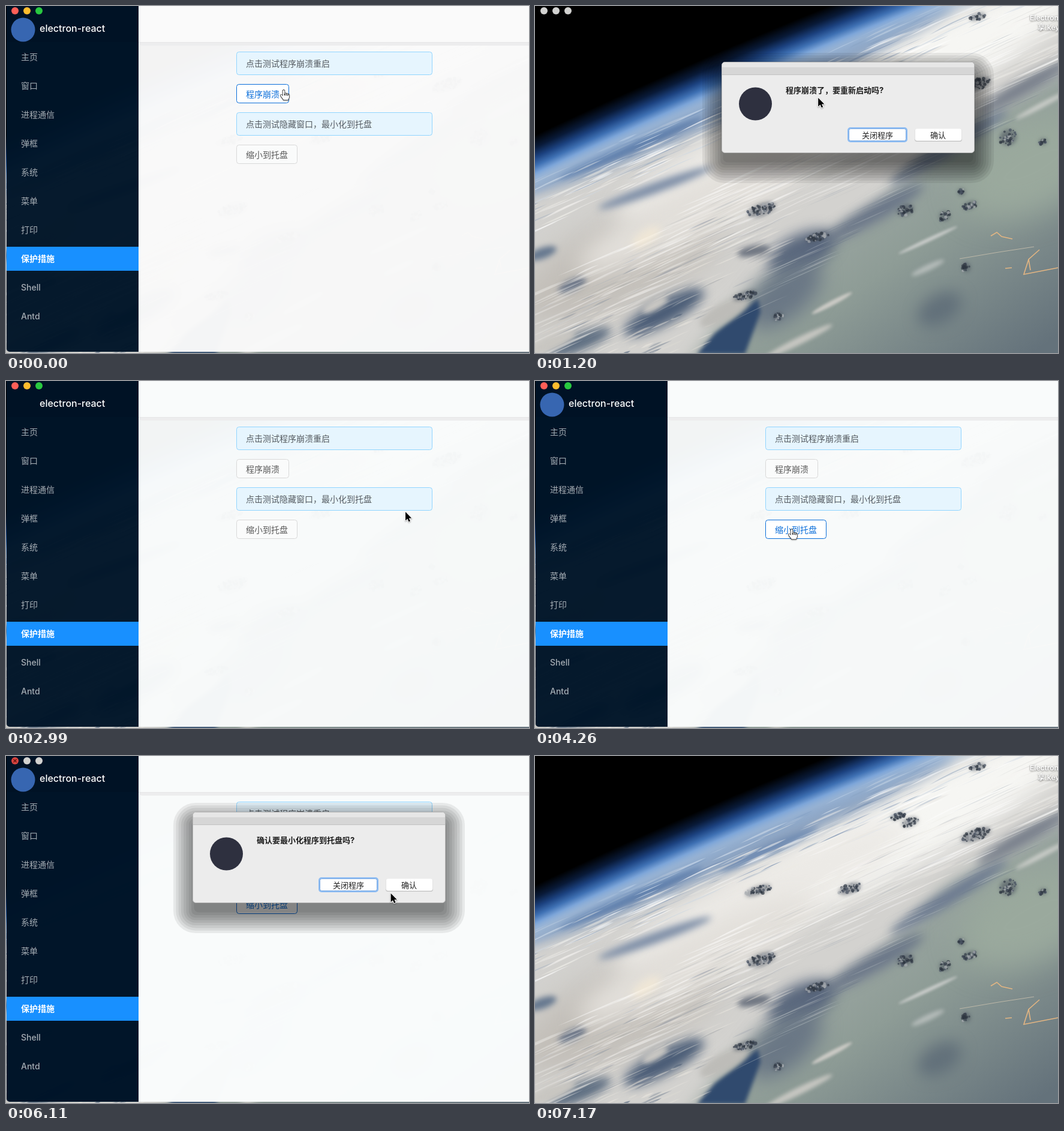
These frames come from a looping animation (872 px wide and 578 px high, 7.78 s). An HTML page with a canvas:

```html
<!DOCTYPE html>
<html lang="zh-CN">
<head>
<meta charset="utf-8">
<title>electron-react</title>
<style>
html, body { margin: 0; width: 100%; height: 100%; overflow: hidden; background: #000; }
canvas { display: block; }
</style>
</head>
<body>
<canvas id="stage" width="872" height="578"></canvas>
<script>
const W = 872, H = 578, LOOP = 7780;
const canvas = document.getElementById('stage');
const FONT = 'Inter, "Noto Sans CJK SC", "Noto Sans CJK", sans-serif';
let ctx = canvas.getContext('2d');

// ---------- helpers ----------
let seed = 7;
function rnd() {
  seed = (seed + 0x6D2B79F5) | 0;
  let x = Math.imul(seed ^ (seed >>> 15), 1 | seed);
  x = (x + Math.imul(x ^ (x >>> 7), 61 | x)) ^ x;
  return ((x ^ (x >>> 14)) >>> 0) / 4294967296;
}
const span = (a, b) => a + rnd() * (b - a);
const pick = list => list[Math.floor(rnd() * list.length)];

function box(x, y, w, h, r, fill, stroke) {
  ctx.beginPath();
  ctx.roundRect(x, y, w, h, r);
  if (fill) { ctx.fillStyle = fill; ctx.fill(); }
  if (stroke) { ctx.strokeStyle = stroke; ctx.lineWidth = 1; ctx.stroke(); }
}
function disc(x, y, r, fill) {
  ctx.beginPath();
  ctx.arc(x, y, r, 0, 7);
  ctx.fillStyle = fill;
  ctx.fill();
}
function text(str, x, y, color, size = 14, weight = 400, align = 'left') {
  ctx.font = `${weight} ${size}px ${FONT}`;
  ctx.textAlign = align;
  ctx.textBaseline = 'alphabetic';
  ctx.fillStyle = color;
  ctx.fillText(str, x, y + size * 0.36);
}
function poly(points, fill) {
  ctx.beginPath();
  points.forEach(p => ctx.lineTo(p[0], p[1]));
  ctx.closePath();
  ctx.fillStyle = fill;
  ctx.fill();
}

// ---------- wallpaper: planet limb with cloud bands ----------
function blob(x, y, rx, ry, deg, color, blur = 8) {
  ctx.save();
  ctx.filter = `blur(${blur}px)`;
  ctx.translate(x, y);
  ctx.rotate(deg * Math.PI / 180);
  ctx.beginPath();
  ctx.ellipse(0, 0, rx, ry, 0, 0, 7);
  ctx.fillStyle = color;
  ctx.fill();
  ctx.restore();
}
// Thin slivers parallel to the limb; v is the depth below it.
function streaks(n, [u0, u1], [v0, v1], tilt, colors, len, thick, alpha) {
  ctx.save();
  ctx.translate(0, 285);
  ctx.rotate(-24 * Math.PI / 180);
  for (let i = 0; i < n; i++) {
    const u = span(u0, u1), v = span(v0, v1) + (872 - u) * tilt;
    const l = len * span(0.3, 1), b = span(-0.1, 0.06) * l, w = thick * span(0.3, 1);
    ctx.globalAlpha = alpha * span(0.4, 1);
    ctx.fillStyle = pick(colors);
    ctx.beginPath();
    ctx.moveTo(u - l, v - b);
    ctx.quadraticCurveTo(u, v - w, u + l, v - b * 0.5);
    ctx.quadraticCurveTo(u, v + w, u - l, v - b);
    ctx.fill();
  }
  ctx.restore();
}
function cumulus(x, y, rx, ry) {
  blob(x, y, rx, ry, -20, 'rgba(70,78,90,.55)', 3);
  for (let i = 0; i < rx * 2.2; i++) {
    const a = span(0, 6.3), d = Math.sqrt(rnd());
    const px = Math.cos(a) * d * rx, py = Math.sin(a) * d * ry - px * 0.25;
    ctx.globalAlpha = 0.7;
    disc(x + px, y + py, span(1, 3), pick(['#333c49', '#465060', '#2c343e', '#a9aeb2']));
  }
  ctx.globalAlpha = 1;
}
function paintWallpaper() {
  let g = ctx.createLinearGradient(560, 200, 830, 578);
  g.addColorStop(0, '#a3ada9');
  g.addColorStop(0.45, '#8e9c96');
  g.addColorStop(1, '#64727b');
  ctx.fillStyle = g;
  ctx.fillRect(0, 0, W, H);
  blob(830, 265, 130, 75, -25, '#9aa99d', 25);

  // main cloud mass
  ctx.filter = 'blur(14px)';
  poly([[-40, 260], [650, -30], [900, -30], [900, 95], [690, 215], [560, 345], [430, 420], [330, 500], [240, 620], [-40, 620]], '#d3d2cf');
  ctx.filter = 'none';
  blob(140, 430, 190, 70, -24, '#c2beb8', 25);
  blob(620, 120, 330, 62, -28, '#f6f6f3', 18);
  blob(380, 235, 270, 55, -26, '#eceae6', 18);
  blob(270, 340, 220, 45, -26, '#e2dfda', 18);

  // blue haze under the limb and dark gaps
  blob(330, 158, 400, 26, -23.5, '#8ca3c1', 10);
  blob(160, 236, 130, 8, -23, '#5878a6', 5);
  blob(390, 155, 90, 8, -24, '#6f8bb2', 5);
  blob(200, 303, 100, 9, -20, '#8090a8', 6);
  blob(690, 235, 115, 12, -32, '#6c7a90', 8);
  blob(815, 135, 90, 13, -30, '#787f8b', 8);
  blob(565, 345, 95, 15, -30, '#697587', 9);
  blob(445, 410, 60, 30, -25, '#58667c', 11);
  blob(365, 408, 28, 9, -10, '#6d7480', 5);
  blob(415, 480, 75, 40, -40, '#6a7785', 16);
  blob(215, 510, 75, 20, -28, '#4a5c76', 9);
  blob(62, 465, 25, 9, -25, '#6c7688', 5);
  blob(75, 560, 55, 14, -22, '#596a7e', 8);
  blob(12, 412, 25, 9, -20, '#66788f', 5);
  blob(675, 505, 40, 24, -30, '#62707a', 12);
  ctx.filter = 'blur(3px)';
  poly([[270, 580], [300, 545], [372, 488], [376, 510], [350, 580]], '#304a6e');
  ctx.filter = 'none';

  const pale = ['#fff', '#f4f3f0', '#e9e7e2'], cool = ['#7c93b2', '#5f7ca6', '#9aabc0'];
  streaks(190, [-60, 900], [3, 85], 0, pale.concat('#cfd8e2'), 55, 3.5, 0.65);
  streaks(75, [-60, 800], [8, 75], 0, cool, 45, 2.5, 0.6);
  streaks(260, [-80, 900], [80, 185], 0.1, pale, 75, 3.5, 0.5);
  streaks(150, [-80, 900], [75, 190], 0.13, ['#b9bbbd', '#c9c8c6', '#a6adb7'], 55, 1.8, 0.45);
  streaks(130, [-170, 330], [80, 220], 0.16, ['#d9d5ce', '#a3a5a8', '#eeeae2', '#7d8796'], 40, 3, 0.5);
  streaks(60, [-150, 180], [230, 320], 0.08, ['#dedbd4', '#efebe3', '#4d5f78'], 26, 4, 0.6);
  streaks(50, [250, 880], [165, 205], 0.24, ['#c4cacb', '#dcdedb', '#5d6c82'], 70, 2, 0.4);

  blob(185, 385, 28, 11, -35, 'rgba(248,235,212,.65)', 7);
  blob(315, 510, 45, 15, -28, '#bdbcb8', 5);
  blob(200, 498, 24, 8, -30, '#cbc9c4', 4);
  blob(30, 560, 40, 11, -22, '#c8c6c1', 4);
  blob(655, 390, 54, 3, -25, '#c9ccca', 2);
  blob(655, 436, 30, 5, -25, '#b4bbb9', 3);
  blob(495, 495, 38, 4, -28, '#cbcac5', 2);
  blob(440, 558, 62, 6, -26, '#c6c6c1', 3);
  blob(845, 165, 50, 4, -28, '#ccceca', 3);

  [[378, 339, 24, 10], [525, 221, 19, 8], [735, 131, 26, 9], [625, 110, 14, 7], [372, 224, 22, 7],
   [789, 219, 14, 13], [618, 340, 14, 9], [725, 332, 12, 6], [711, 310, 6, 6], [719, 435, 7, 8],
   [738, 18, 13, 5], [605, 100, 12, 5], [470, 385, 20, 6], [350, 482, 20, 6], [405, 517, 9, 6],
   [683, 350, 9, 8], [847, 226, 7, 5]].forEach(c => cumulus(...c));

  // city lights
  ctx.lineWidth = 1.6;
  ctx.strokeStyle = '#e3b582';
  ctx.stroke(new Path2D('M841 406L823 422L815 447L872 436M823 422L826 440M760 383L770 377L778 384L796 388M784 437L795 436'));
  ctx.lineWidth = 1;
  ctx.strokeStyle = '#bdb8a8';
  ctx.stroke(new Path2D('M708 421Q770 410 832 401'));

  // atmosphere and space
  g = ctx.createRadialGradient(3880, 8400, 8965, 3880, 8400, 9058);
  [[0, 'rgba(150,180,215,0)'], [0.25, 'rgba(150,182,220,.6)'], [0.38, '#7ba4d8'], [0.5, '#3f71b4'],
   [0.64, '#1c4280'], [0.8, '#091a38'], [1, '#000']].forEach(s => g.addColorStop(...s));
  ctx.fillStyle = g;
  ctx.fillRect(0, 0, W, H);

  ctx.shadowColor = 'rgba(0,0,0,.6)';
  ctx.shadowBlur = 3;
  ctx.shadowOffsetY = 1;
  text('Electron分', 825, 20, '#fff', 12, 600);
  text('享.key', 838, 36, '#fff', 12, 600);
}
const wallpaper = document.createElement('canvas');
wallpaper.width = W;
wallpaper.height = H;
const screen = ctx;
ctx = wallpaper.getContext('2d');
paintWallpaper();
ctx = screen;

// ---------- app window ----------
const MENU = ['主页', '窗口', '进程通信', '弹框', '系统', '菜单', '打印', '保护措施', 'Shell', 'Antd'];

function notice(y, label) {
  box(384.5, y + 0.5, 326, 38, 4, '#e6f5fe', '#91d5ff');
  text(label, 400, y + 20, '#555b60');
}
function button(y, w, label, active) {
  box(384.5, y + 0.5, w - 1, 31, 4, active ? '#fff' : '#fafbfb', active ? '#096dd9' : '#d9d9d9');
  text(label, 400, y + 17, active ? '#096dd9' : '#595959');
}
function app(t) {
  const paper = t < 500 ? '#fafafa' : '#f9fbfb';
  ctx.save();
  ctx.beginPath();
  ctx.roundRect(1, -10, 890, 586, 5);
  ctx.clip();
  ctx.globalAlpha = t >= 5150 ? 0.997 : 0.972;
  ctx.fillStyle = '#001529';
  ctx.fillRect(0, 0, 221, H);
  ctx.fillStyle = paper;
  ctx.fillRect(221, 0, W, H);
  ctx.globalAlpha = 1;
  ctx.fillStyle = '#001225';
  ctx.fillRect(0, 0, 221, 60);
  box(222, 56, 670, 10, 5, '#ededee');
  ctx.fillStyle = '#e6e7e7';
  ctx.fillRect(221, 60, W, 1);
  ctx.fillStyle = paper;
  ctx.fillRect(221, 0, W, 60);
  ctx.restore();

  if (t < 500 || t >= 3170) disc(28.5, 39.5, 20, '#3766b1');
  text('electron-react', 56, 37, '#fff', 16, 500);
  MENU.forEach((label, i) => {
    const y = 85 + i * 48, on = i === 7;
    if (on) {
      ctx.fillStyle = '#1890ff';
      ctx.fillRect(1, y - 20, 220, 40);
    }
    text(label, 25, y, on ? '#fff' : '#a6adb4', 14, on ? 700 : 500);
  });

  if (t >= 4700 && t < 5150) {
    ctx.fillStyle = '#f6f7f7';
    ctx.fillRect(237, 66, 569, 267);
  }
  notice(76, '点击测试程序崩溃重启');
  button(130, 88, '程序崩溃', t < 500);
  notice(177, '点击测试隐藏窗口，最小化到托盘');
  button(231, 102, '缩小到托盘', t >= 4080);
}
function lights(mode) {
  const gray = '#d2d2d0';
  const colors = { on: ['#ff5f57', '#febc2e', '#28c840'], off: [gray, gray, gray], edited: ['#d9453f', gray, gray] }[mode];
  colors.forEach((c, i) => disc(15 + i * 20, 8, 6, c));
  if (mode === 'edited') {
    ctx.strokeStyle = '#5c0f0c';
    ctx.lineWidth = 1.3;
    ctx.stroke(new Path2D('M12.5 5.5L17.5 10.5M17.5 5.5L12.5 10.5'));
  }
}

// ---------- message box ----------
function dialog(scale, title, left, right, pressed) {
  ctx.save();
  ctx.translate(522, 168.5);
  ctx.scale(scale, scale);
  ctx.translate(-522, -168.5);
  for (let i = 0; i < 9; i++) {
    const e = 33 - i * 4.3;
    box(312 - e, 111 - e, 420 + 2 * e, 151 + 2 * e, Math.max(8, e + 4), 'rgba(0,0,0,.07)');
  }
  box(311.5, 93.5, 421, 151, 5, '#ececec', '#b4b4b4');
  box(312, 94, 420, 12, [5, 5, 0, 0], '#e6e6e6');
  ctx.fillStyle = '#d6d6d6';
  ctx.fillRect(312, 102, 420, 12);
  ctx.fillStyle = '#c2c2c2';
  ctx.fillRect(312, 114, 420, 1);
  disc(367.5, 163, 27.5, '#2e303f');
  text(title, 418, 140.5, '#1c1c1c', 13, 700);
  box(521, 202, 100, 25, 5, '#8fbdf3');
  box(523.5, 204.5, 95, 20, 3, '#fff', '#79a9e2');
  text(left, 571, 215, '#222', 13, 400, 'center');
  box(633, 205, 79, 21, 4, '#c6c6c6');
  box(633.5, 204.5, 78, 20, 4, pressed ? '#3f8ef5' : '#fff');
  text(right, 672, 215, pressed ? '#fff' : '#222', 13, 400, 'center');
  ctx.restore();
}
// Zooms in past full size, then settles.
function pop(age) {
  if (age < 180) return 0.5 + 0.56 * Math.max(0, age) / 180;
  return age >= 360 ? 1 : 1.06 - 0.05 * Math.min(1, (age - 180) / 90) - (age > 270 ? 0.01 * (age - 270) / 90 : 0);
}

// ---------- pointer ----------
const SHAPES = {
  arrow: 'M0 0V14.5L3.4 11.4L5.6 16.4L8 15.3L5.8 10.5H10.3Z',
  hand: 'M-1.5 1Q0 -1 1.5 1V6Q3 4.5 4.2 6Q5.8 5.2 7 6.8Q9 6.2 9.3 8.5V11.5L7.5 16.5H0L-4.5 10.5Q-6 8 -4.5 7.8Q-3 7.8 -1.5 10Z'
};
function pointer(kind, x, y) {
  ctx.save();
  ctx.translate(x, y);
  ctx.lineJoin = 'round';
  if (kind === 'beam') {
    const p = new Path2D('M-3 -8Q0 -8 0 -5Q0 -8 3 -8M0 -6V6M-3 8Q0 8 0 5Q0 8 3 8M-2 2H2');
    ctx.strokeStyle = 'rgba(255,255,255,.8)';
    ctx.lineWidth = 2.6;
    ctx.stroke(p);
    ctx.strokeStyle = '#111';
    ctx.lineWidth = 1.2;
    ctx.stroke(p);
  } else {
    const p = new Path2D(SHAPES[kind]), arrow = kind === 'arrow';
    ctx.shadowColor = 'rgba(0,0,0,.35)';
    ctx.shadowBlur = 2;
    ctx.shadowOffsetY = 1;
    ctx.strokeStyle = arrow ? '#fff' : '#000';
    ctx.lineWidth = arrow ? 2 : 1.3;
    ctx.fillStyle = arrow ? '#000' : '#fff';
    ctx.stroke(p);
    ctx.shadowColor = 'transparent';
    ctx.fill(p);
    if (!arrow) ctx.stroke(new Path2D('M1.5 6V9M4.2 6.5V9M7 7V9.5'));
  }
  ctx.restore();
}
// Progress in n even jumps, the first at a and the last at b.
function jumps(t, a, b, n) {
  if (t < a) return 0;
  return Math.min(1, (Math.floor((t - a) / ((b - a) / (n - 1)) + 1e-6) + 1) / n);
}
const ease = p => p * p * (3 - 2 * p);
const curve = (p, a, c, b) => [0, 1].map(i => (1 - p) ** 2 * a[i] + 2 * p * (1 - p) * c[i] + p * p * b[i]);
const START = [463, 140], RIGHT = [666, 218], TRAY = [428, 247], NEAR = [632, 236], OK = [655, 212];

function pointerAt(t) {
  if (t < 3470) return curve(ease(jumps(t, 1200, 1830, 8)), START, [570, 295], RIGHT);
  if (t < 5150) return curve(ease(jumps(t, 3470, 4170, 9)), RIGHT, [540, 155], TRAY);
  if (t < 5940) return curve(ease(jumps(t, 5150, 5850, 9)), TRAY, [530, 255], NEAR);
  return curve(ease(jumps(t, 5940, 6640, 9)), NEAR, [674, 205], OK);
}
function pointerKind(t) {
  if (t < 500 || (t >= 4080 && t < 4440)) return 'hand';
  return t >= 500 && t < 930 ? 'beam' : 'arrow';
}

// ---------- timeline ----------
function draw(t) {
  ctx.drawImage(wallpaper, 0, 0);
  const shown = t < 500 || (t >= 2990 && t < 7000);
  const asking = t >= 4440 && t < 6820;
  if (shown) app(t);
  if (t < 7000) lights(t >= 500 && t < 2090 ? 'off' : asking ? 'edited' : 'on');
  if (t >= 830 && t < 2000) dialog(pop(t - 660), '程序崩溃了，要重新启动吗?', '关闭程序', '确认', false);
  if (t >= 4520 && asking) dialog(pop(t - 4520), '确认要最小化程序到托盘吗?', '关闭程序', '确认', t >= 6730);
  if (t < 7170) pointer(pointerKind(t), ...pointerAt(t));
}
const begin = performance.now();
function tick() {
  draw((performance.now() - begin) % LOOP);
  requestAnimationFrame(tick);
}
tick();
</script>
</body>
</html>
```
